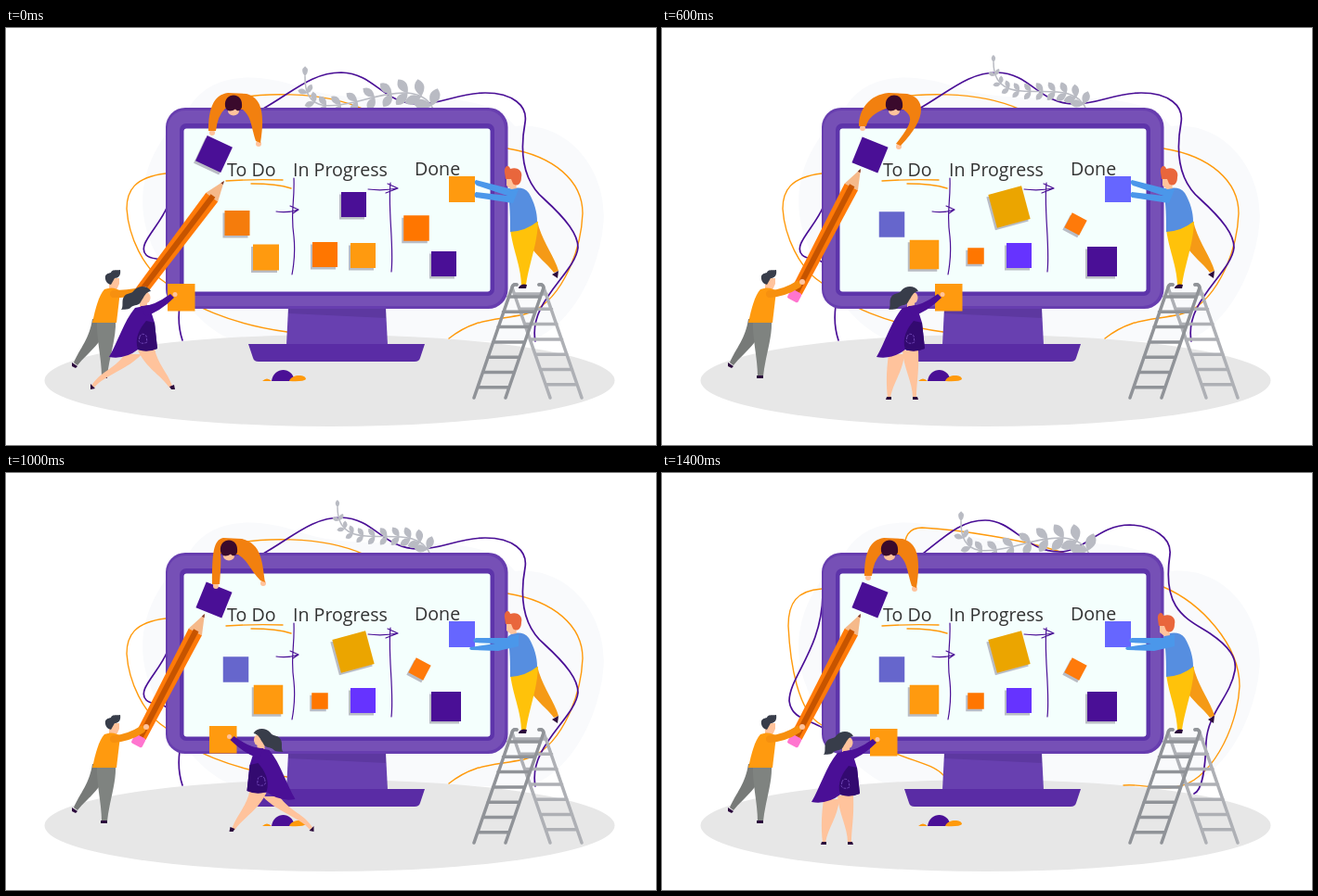
An HTML page that plays this animation: 700 px wide and 450 px high, repeating every 1500 ms.

```html
<!DOCTYPE html>
<html lang="en">
<head>
<meta charset="utf-8">
<title>Task board</title>
<style>
html, body { margin: 0; height: 100%; overflow: hidden; background: #fff; }
svg { display: block; width: 700px; height: 450px; }
text { font: 19.6px "Open Sans", sans-serif; fill: #333; }
.line { fill: none; stroke-linecap: round; stroke-linejoin: round; }
.violet { stroke: #4a0f96; stroke-width: 1.7; }
.amber { stroke: #ff9a0c; stroke-width: 1.4; }
.thin { stroke-width: 1.2; }
.skin { fill: #ffc39c; }
.shoe { fill: #2b0a3c; }
</style>
</head>
<body>
<svg viewBox="0 0 700 450">
  <path fill="#f9fafc" d="M195 90C215 50 265 45 320 65C400 90 510 55 548 106C610 100 650 160 643 215C636 275 600 330 560 338H250C215 330 185 290 165 250C130 190 150 130 195 90Z"/>
  <ellipse cx="348.5" cy="380.5" rx="307" ry="49.5" fill="#e7e7e7"/>

  <g id="lines0" class="line">
    <g class="amber">
      <path d="M236 79C270 69 340 67 386 88M540 130C590 138 621 165 621 200C619 245 595 300 558 309C525 316 505 313 477 335"/>
      <path d="M172 157C138 161 130 176 130 195C132 225 148 260 172 275C195 300 245 320 303 328"/>
    </g>
    <g class="violet">
      <path d="M277 87C310 68 330 48 361 48C398 49 405 82 445 82C470 82 488 70 516 70C546 70 562 84 559 102C552 140 560 168 580 185C604 207 616 223 616 237C613 265 562 295 570 338"/>
      <path d="M174 192C165 215 140 234 151 245C157 251 166 247 173 253M187 300C185 315 187 328 190 337"/>
    </g>
  </g>
  <g id="lines1" class="line">
    <g class="amber">
      <path d="M261 87C260 68 266 59 280 59C320 61 390 72 432 86M540 123C580 140 622 185 622 230C620 275 590 336 552 339C530 342 516 335 497 337"/>
      <path d="M172 125C145 127 136 140 136 165C138 205 146 258 172 272M253 303C270 311 292 314 303 326"/>
    </g>
    <g class="violet">
      <path d="M281 87C305 68 322 51 348 51C378 51 392 85 428 85C455 85 470 56 504 56C528 57 549 69 547 88C538 148 565 157 590 173C612 188 619 200 617 213C612 242 588 258 586 290C585 320 582 342 573 346"/>
      <path d="M173 132C172 190 137 220 137 246C139 265 158 266 173 275M196 302C196 315 196 326 198 336"/>
    </g>
  </g>

  <g id="plant" fill="#b9bbc3"></g>

  <path fill="#6840b0" d="M304 302H409L411 342H302Z"/>
  <path fill="#5d38a0" d="M304 302H409V313L304 308Z"/>
  <path fill="#5a2ca5" d="M261 341H451L446 356Q445 360 440 360H272Q267 360 266 356Z"/>
  <rect x="172" y="86" width="368.500" height="217" rx="21" fill="#673daf"/>
  <rect x="174" y="89" width="363" height="211" rx="19" fill="#7650b6"/>
  <rect x="187" y="103" width="339" height="186" rx="7" fill="#5d34aa"/>
  <rect x="191.500" y="108.500" width="330" height="176" rx="3" fill="#f4fffd"/>

  <text x="238" y="160">To Do</text>
  <text x="309" y="160">In Progress</text>
  <text x="440" y="159">Done</text>
  <path class="line amber" d="M237 165Q265 163 298 164M264 168Q292 168 307 173"/>
  <path class="line violet thin" d="M310 162C311 190 306 198 310 225Q312 245 308 266M414 167C411 195 418 235 415 263M291 198Q303 200 315 196M306 192L315 196L309 200M390 174Q406 176 422 173M411 168L422 173L409 178"/>

  <g id="board0"></g>
  <g id="board1"></g>

  <g id="sitter">
    <g id="hands" class="skin"><circle r="3"/><circle r="3"/></g>
    <path id="arms" fill="#f2800f"/>
    <g id="head">
      <ellipse class="skin" cy="7" rx="6" ry="5"/>
      <path fill="#3a0a2c" d="M-9 2C-10 -6 -5 -10 0 -10C6 -10 10 -5 9 3C8 7 4 8 2 5C-2 8 -8 8 -9 2Z"/>
    </g>
  </g>

  <g id="ladder" class="line" stroke-width="3.500"></g>

  <g id="helper">
    <path fill="#f59a16" d="M556 212L572 208C577 230 590 245 595 262L590 264C580 250 560 240 556 212Z"/>
    <path fill="#ffc20a" d="M543 217L573 209C572 235 563 255 560 277H555C554 255 546 240 543 217Z"/>
    <path class="shoe" d="M552 280Q555 275 561 277L560 281H552ZM588 266L595 262L594 270Z"/>
    <path fill="#568ee0" d="M540 177C546 171 558 171 563 178C569 188 572 199 572 209Q560 219 543 220C543 205 543 190 540 177Z"/>
    <path id="reach0" fill="#4b97ea" d="M552 174L541 173L506 164Q503 167 507 170L540 181L506 177Q503 180 506 183L546 189Z"/>
    <path id="reach1" fill="#4b97ea" d="M552 174L540 178L506 178Q501 180 505 183L527 184L500 188Q498 190 501 191L530 192L552 187Z"/>
    <g id="helperHead">
      <path class="skin" d="M539 162L548 163L550 173L544 174L539 170Z"/>
      <path fill="#e9663c" d="M537 156C536 148 542 147 543 152C551 149 557 155 555 161C555 170 549 171 546 168L544 163L538 163Z"/>
    </g>
  </g>

  <g id="pile">
    <path fill="#4a0f96" d="M286 381C288 366 308 364 311 381Z"/>
    <path fill="#ff9a0c" d="M305 381C308 373 323 374 323 379Q320 382 305 381ZM276 381Q281 376 286 381Z"/>
  </g>

  <g id="pencil">
    <path fill="#f5b98a" d="M0 0L22 -8V8Z"/>
    <path fill="#7a3a2c" d="M0 0L4 -1.500V1.500Z"/>
    <path fill="#ff7a08" d="M22 -8L150 -6.500V6.500L22 8Z"/>
    <path fill="#c65400" d="M20 -3H150V3H20Z"/>
    <rect x="149" y="-6.500" width="11" height="13" rx="2" fill="#ff75cf"/>
  </g>

  <g id="writer">
    <path fill="#777a78" d="M93 314H110C108 338 88 350 77 364L73 361C80 345 90 335 93 314Z"/>
    <path fill="#7f8380" d="M98 315H118C119 335 111 355 109 376H103C103 355 97 335 98 315Z"/>
    <path class="shoe" d="M71 361L77 365L75 367L71 365ZM102 375H109V378H102Z"/>
    <path class="skin" d="M111 270H122V276L118 285H111Z"/>
    <path fill="#383d4a" d="M107 271C106 265 110 265 113 264C114 260 120 262 123 261C124 267 121 270 117 270L113 277Q108 276 107 271Z"/>
    <path fill="#ff9a0f" d="M106 282Q116 278 123 284L119 318H93C96 304 100 288 106 282Z"/>
    <path id="grip0" class="line" stroke="#f7900f" stroke-width="8" d="M116 287Q130 287 146 284"/>
    <path id="grip1" class="line" stroke="#f7900f" stroke-width="8" d="M116 287Q132 286 146 277"/>
    <circle id="writerHand" class="skin" r="3"/>
  </g>

  <g id="walker">
    <g id="legs0" class="skin">
      <path d="M-46 352L-28 352C-42 368 -67 374 -79 388L-82 386C-72 370 -58 369 -46 352Z"/>
      <path d="M-32 348L-14 346C-11 362 0 372 5 386L2 388C-8 374 -23 367 -32 348Z"/>
      <path class="shoe" d="M-83 384L-78 389L-83 390ZM2 387L7 385L8 390H4Z"/>
    </g>
    <g id="legs1" class="skin">
      <path d="M-50 352H-33C-35 372 -45 382 -48 399H-51C-53 382 -52 367 -50 352Z"/>
      <path d="M-35 348H-18C-17 372 -20 384 -20 399H-24C-24 382 -34 367 -35 348Z"/>
      <path class="shoe" d="M-52 398H-47V401H-53ZM-24 398H-19L-18 401H-24Z"/>
    </g>
    <rect y="276" width="29.500" height="29.500" fill="#ff9a0f"/>
    <ellipse class="skin" cx="-23" cy="291" rx="4.500" ry="6"/>
    <path class="skin" d="M-30 292H-22V302H-30Z"/>
    <path fill="#383d4a" d="M-50 304C-47 301 -50 294 -47 290C-44 285 -39 288 -36 283C-31 277 -21 278 -18 284C-24 285 -25 290 -28 294C-31 301 -36 298 -39 301C-42 305 -46 303 -50 304Z"/>
    <path fill="#4a0f96" d="M-35 302L-20 299L-14 318L-11 346Q-22 350 -32 347Q-46 358 -63 355C-54 340 -47 316 -35 302Z"/>
    <path fill="#330a70" d="M-23 316L-14 318L-11 346Q-22 351 -32 347C-36 335 -30 324 -23 316Z"/>
    <path class="line" stroke="#6f45b5" stroke-dasharray="2 2" d="M-30 333Q-28 328 -23 332L-22 339Q-28 342 -31 338Z"/>
    <path fill="#4a0f96" d="M-29 300Q-16 301 3 287L7 291Q-8 306 -24 311Z"/>
    <circle class="skin" cx="8" cy="287.500" r="2.500"/>
  </g>
</svg>

<script>
const LOOP = 1500;
const HELD = new Set([50, 150, 250, 350, 1100, 1300, 1450]);
const $ = id => document.getElementById(id);
const place = (el, value) => el.setAttribute('transform', value);
const show = (name, state) => [0, 1].forEach(i => {
  $(name + i).style.display = i === state ? '' : 'none';
});
const flip = (t, half, offset = 0) => Math.floor((t + offset) / half) % 2;

// Linear blend between rows of [time, ...values].
function blend(rows, t) {
  const next = rows.findIndex(row => row[0] > t);
  if (next < 0) return rows.at(-1).slice(1);
  if (next === 0) return rows[0].slice(1);
  const a = rows[next - 1], b = rows[next], k = (t - a[0]) / (b[0] - a[0]);
  return a.slice(1).map((v, i) => v + (b[i + 1] - v) * k);
}

// Sticky note given by centre, size, colour and angle.
function note(x, y, size, colour, angle = 0, shadow = true) {
  const square = (dx, dy, fill) =>
    `<rect x="${-size / 2}" y="${-size / 2}" width="${size}" height="${size}" fill="${fill}"
      transform="translate(${x + dx} ${y + dy}) rotate(${angle})"/>`;
  return (shadow ? square(-2, 2.5, '#b9bcc4') : '') + square(0, 0, colour);
}

$('board0').innerHTML = [
  [249, 210.5, 27, '#f57c0c'], [280, 247.5, 28, '#ff9a0f'], [374.5, 190.5, 27, '#4a0f96'],
  [343.5, 244.5, 27, '#ff7600'], [384.5, 245.5, 27, '#ff9a0f'], [442, 216, 27.5, '#ff7600'],
  [471.5, 254.5, 27, '#4a0f96'], [491, 174, 28, '#ff9a0f', 0, false], [224, 136, 30, '#4a0f96', 25]
].map(n => note(...n)).join('');
$('board1').innerHTML = [
  [247.5, 212, 27.5, '#6666cc', 0, false], [282.5, 244.5, 31.5, '#ff9a0f'], [374, 193, 37, '#eba500', -15],
  [338, 246, 17.5, '#ff7600'], [384.5, 245.5, 27, '#6633ff'], [445.5, 211.5, 18, '#ff7a0a', 28],
  [474, 252, 32, '#4a0f96'], [491, 174, 28, '#6666ff', 0, false], [224, 137, 30, '#4a0f96', 22, false]
].map(n => note(...n)).join('');

function ladderSide(lean, colour, first) {
  const shift = y => lean * (y - 278) / 121;
  let d = `M${545 + lean} 399L545 280Q546 276 550 277M${579 + lean} 399L579 280Q578 276 574 277`;
  for (let y = first; y < 395; y += 16.3)
    d += `M${545 + shift(y)} ${y}H${579 + shift(y)}`;
  return `<path d="${d}" stroke="${colour}"/>`;
}
$('ladder').innerHTML = ladderSide(41, '#aeb0b5', 287) + ladderSide(-41, '#909398', 290);

// Stem as a cubic curve, then leaf size.
const low = [322, 52, 320, 132, 440, 28, 462, 92, 1.2];
const tall = [336, 22, 336, 104, 452, 30, 460, 88, 1.05];
const small = [357, 37, 357, 96, 440, 45, 457, 88, 0.9];
const plantKeys = [
  [0, ...low], [200, ...tall], [300, ...tall], [600, ...small],
  [1000, ...small], [1250, ...tall], [1400, ...low]
];

function drawPlant(t) {
  const [x0, y0, x1, y1, x2, y2, x3, y3, size] = blend(plantKeys, t);
  const leaf = (x, y, angle, length) =>
    `<path d="M0 0Q${length * 0.6} ${-length * 0.55} ${length} 0Q${length * 0.6} ${length * 0.55} 0 0"
      transform="translate(${x} ${y}) rotate(${angle})"/>`;
  const at = (a, b, c, d, u) => {
    const v = 1 - u;
    return a * v ** 3 + 3 * b * v * v * u + 3 * c * v * u * u + d * u ** 3;
  };
  let art = `<path class="line" stroke="#b9bbc3" stroke-width="1.5"
    d="M${x0} ${y0}C${x1} ${y1} ${x2} ${y2} ${x3} ${y3}"/>`;
  for (let i = 0; i < 11; i++) {
    const u = i / 10.5;
    const x = at(x0, x1, x2, x3, u), y = at(y0, y1, y2, y3, u);
    const back = Math.atan2(y - at(y0, y1, y2, y3, u + 0.01), x - at(x0, x1, x2, x3, u + 0.01)) * 180 / Math.PI;
    const length = (8 + 9 * u) * size;
    art += i ? leaf(x, y, back + 50, length) + leaf(x, y, back - 50, length) : leaf(x, y, back, 9 * size);
  }
  $('plant').innerHTML = art;
}

// Left hand, head x, right hand, right elbow x.
const sitterKeys = [
  [0, 222, 111, 245, 272, 124, 270], [200, 219, 106, 250, 248, 120, 279],
  [300, 219, 106, 250, 248, 120, 279], [600, 216, 106, 250, 255, 127, 277],
  [850, 222, 111, 245, 272, 124, 270], [1000, 226, 120, 240, 277, 118, 268],
  [1250, 221, 120, 240, 272, 119, 268], [1400, 222, 111, 245, 272, 124, 270]
];

function drawSitter(t) {
  const [lx, ly, head, rx, ry, elbow] = blend(sitterKeys, t);
  $('arms').setAttribute('d',
    `M${lx - 4} ${ly}C${lx - 4} 88 223 72 ${head - 6} 70L${head + 14} 71
     C${elbow + 8} 76 ${elbow + 8} 98 ${rx + 2} ${ry}L${rx - 3} ${ry - 2}
     C${elbow - 7} 102 ${elbow - 6} 96 ${head + 10} 88L${head - 9} 87Q${lx + 6} 94 ${lx + 4} ${ly}Z`);
  const [left, right] = $('hands').children;
  place(left, `translate(${lx} ${ly + 2})`);
  place(right, `translate(${rx} ${ry + 1})`);
  place($('head'), `translate(${head} 82.5)`);
}

function drawWalker(t) {
  const right = t < 700 || t >= 1350;
  const keys = t < 700 ? [[0, 174], [200, 224], [300, 224], [600, 294], [700, 306]]
    : t < 1350 ? [[700, 245], [850, 231], [1000, 219], [1250, 143]]
    : [[1350, 190], [1400, 224]];
  const [x] = blend(keys, t);
  place($('walker'), right ? `translate(${x})` : `translate(${x + 29.5} -3) scale(-1 1)`);
  show('legs', flip(t, 450));
}

function draw(t) {
  const board = flip(t, 200), lines = flip(t, 150);
  show('board', board);
  show('grip', board);
  show('lines', lines);
  show('reach', flip(t, 300, 150));
  place($('helperHead'), lines ? 'translate(-3 2)' : '');
  place($('pencil'), board ? 'translate(214 152) rotate(117.5)' : 'translate(235 165) rotate(127)');
  place($('writerHand'), board ? 'translate(151 274)' : 'translate(149 282)');
  drawPlant(t);
  drawSitter(t);
  drawWalker(t);
}

let shown = -1;
function tick() {
  let t = Math.floor(performance.now() % LOOP / 50) * 50;
  if (HELD.has(t)) t -= 50;
  if (t !== shown) draw(shown = t);
  requestAnimationFrame(tick);
}
tick();
</script>
</body>
</html>
```
